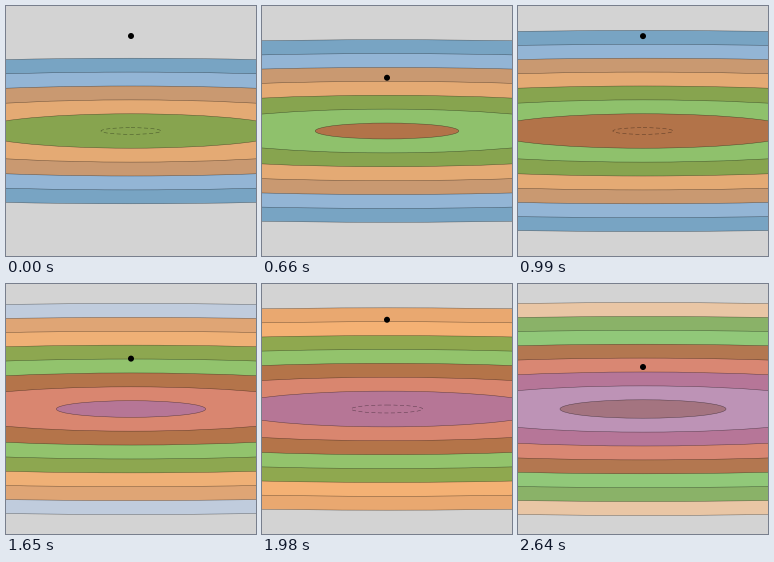
These frames come from a looping animation (250 px wide and 250 px high, 2.97 s). A matplotlib script:

```python
import matplotlib.pyplot as plt
from matplotlib.animation import FuncAnimation
from matplotlib.colors import to_rgba
from matplotlib.patches import Circle, Ellipse
import numpy as np

SIZE, DPI = 250, 100
PX = 72 / DPI                 # one pixel in points
FRAMES, INTERVAL = 9, 330
CENTER = SIZE / 2
SPACING = 125                 # half-width gained between two drops
FLATTEN = 9                   # width to height ratio of a ripple
MAX_RIPPLES = 8
FILL_FROM = 40                # fresh ripples below this half-width are outlines
COLORS = plt.get_cmap("tab20").colors

fig = plt.figure(figsize=(SIZE / DPI, SIZE / DPI), dpi=DPI, facecolor="lightgray")
ax = fig.add_axes([0, 0, 1, 1])
ax.set(xlim=(0, SIZE), ylim=(SIZE, 0))
ax.axis("off")

ripples = [
    ax.add_patch(Ellipse((CENTER, CENTER), 1, 1, facecolor=to_rgba(color, 0.5),
                         edgecolor=(0, 0, 0, 0.5), linewidth=0.5 * PX, zorder=1 + i))
    for i, color in enumerate(COLORS[:11])
]
drop = ax.add_patch(Circle((CENTER, 0), 3, facecolor="black", linewidth=0, zorder=20))


def travelled(frame):
    """Half-width the first ripple would have reached."""
    return np.interp(frame, [0, 4, 8], [655, 988.5, 1333])


def draw(frame):
    distance = travelled(frame)
    for i, ripple in enumerate(ripples):
        half = distance - i * SPACING
        ripple.set_visible(0 < half <= MAX_RIPPLES * SPACING)
        ripple.set_width(2 * half)
        ripple.set_height(2 * half / FLATTEN)
        fresh = half < FILL_FROM
        ripple.set_fill(not fresh)
        ripple.set_linestyle((0, (8, 5)) if fresh else "-")
    drop.center = (CENTER, distance % SPACING)
    return [*ripples, drop]


anim = FuncAnimation(fig, draw, frames=FRAMES, interval=INTERVAL,
                     repeat=True, repeat_delay=0, blit=False)
plt.show()
```
